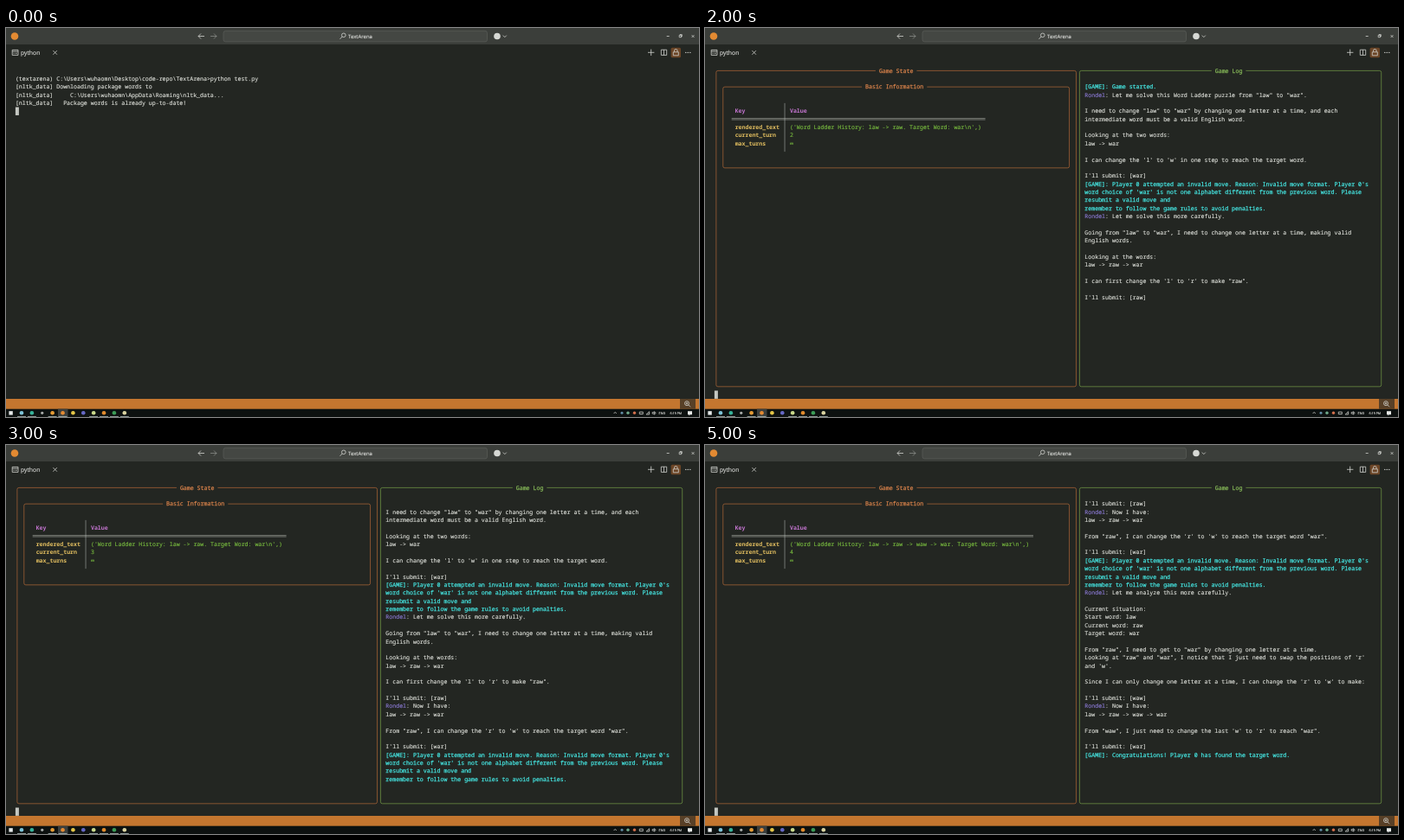
Write an HTML page that moves like this. It is 800 px wide and 450 px high and loops after 6000 ms.

```html
<!DOCTYPE html>
<html lang="en">
<head>
<meta charset="utf-8">
<title>Word Ladder terminal</title>
<style>
  html, body { margin: 0; width: 100%; height: 100%; overflow: hidden; background: #232622; }
  svg { display: block; width: 800px; height: 450px; }
  text { white-space: pre; text-rendering: geometricPrecision; fill: var(--ink); stroke: var(--ink); stroke-width: .14; }
  .term text { --ink: #dcded8; font: 6.597px "Noto Sans Mono", monospace; }
  .ui text { --ink: #d8d9d6; font-family: "Open Sans", "Noto Sans", sans-serif; }
  .term .bold { font-weight: 700; stroke: none; }
  .term .orange { --ink: #d5814a; stroke-width: .25; }
  .term .lime { --ink: #86b958; stroke-width: .25; }
  .term .green { --ink: #78bb3f; }
  .term .pink { --ink: #c475d0; }
  .term .gold { --ink: #e3bf60; }
  .term .cyan { --ink: #45e4e0; stroke-width: .25; }
  .violet { fill: #8878d0; stroke: #8878d0; }
  .line { fill: none; stroke-width: .65; }
  .thin { stroke-width: .5; }
  .icon { fill: none; stroke: #d2d4d0; stroke-width: .8; }
  .scene { visibility: hidden; animation: show 6s step-end infinite; }
  @keyframes show {
    0% { visibility: visible; }
    16.6666%, 100% { visibility: hidden; }
  }
</style>
</head>
<body>
<svg viewBox="0 0 800 450">
  <rect width="800" height="450" fill="#232622"/>
  <g class="ui">
    <rect width="800" height="19" fill="#3b3e3a"/>
    <circle cx="10" cy="9.5" r="4.3" fill="#e38a32"/>
    <path class="icon" d="M229 9.5h-7m3-3l-3 3 3 3"/>
    <path class="icon" stroke-opacity=".5" d="M236 9.5h7m-3-3l3 3-3 3"/>
    <rect x="251" y="3.3" width="304.5" height="12.6" rx="2.5" fill="#444743" stroke="#5b5e59" stroke-width=".7"/>
    <g class="icon"><circle cx="389.8" cy="8.3" r="2.3"/><path d="M388.1 10l-2.6 2.8"/></g>
    <text x="395" y="11.8" font-size="6">TextArena</text>
    <circle cx="567" cy="9.5" r="3.8" fill="#d6d8d4"/>
    <path class="icon" d="M573.8 8.6l2 2 2-2"/>
    <path class="icon" stroke-width=".5" d="M762.7 9.5h3M777.2 8.4h2.3v2.3h-2.3zM778 8.2v-.6h2.3v2.3h-.6M791.7 8.2l2.7 2.7m0-2.7l-2.7 2.7"/>

    <path class="icon" d="M7.2 25.4h6.8v6H7.2zM7.2 27.2h6.8M8.5 29.3h1.2m1 0h2"/>
    <text x="17" y="31.4" font-size="6.8">python</text>
    <path class="icon" d="M54.4 26.2l4.5 4.5m0-4.5l-4.5 4.5"/>
    <path class="icon" d="M741 28.3h7.4M744.7 24.6v7.4M756.3 25.2h6.4v6.2h-6.4zM759.5 25.2v6.2"/>
    <rect x="767.6" y="22.8" width="11.4" height="11.4" rx="1.5" fill="#6b4526"/>
    <path class="icon" stroke="#e0a066" d="M770.3 27.8h6v4h-6zM771.5 27.8v-1.5a1.8 1.8 0 0 1 3.6 0v1.5"/>
    <g fill="#d2d4d0"><circle cx="784.8" cy="28.4" r=".7"/><circle cx="787.3" cy="28.4" r=".7"/><circle cx="789.8" cy="28.4" r=".7"/></g>

    <rect y="429" width="800" height="12" fill="#c4762f"/>
    <rect x="778" y="429" width="18" height="11.6" fill="#584027"/>
    <g class="icon"><circle cx="786" cy="434.2" r="2.5"/><path d="M787.8 436l2.3 2.3M784.8 434.2h2.4M786 433v2.4"/></g>
    <rect y="440.7" width="800" height="9.3" fill="#0d1110"/>
    <rect x="60" y="440.7" width="11.5" height="9.3" fill="#3b3e3d"/>
    <g id="taskbar"></g>
    <path class="icon" stroke-width=".5" d="M701.6 446l1.6-1.6 1.6 1.6M731.3 444.2h4v2.4h-4zM746.2 444.7h1l1.2-1v3.4l-1.2-1h-1zM749.4 444.2q1 1.2 0 2.4M739.2 447l3.4-3.2v3.2z"/>
    <path fill="#e8eae8" d="M787 443.2h5v4h-2.2l-1.3 1.2v-1.2H787z"/>
    <text x="753.6" y="446.8" font-size="3.7">ENG</text>
    <text x="766.6" y="446.8" font-size="3.6">6:19 PM</text>
  </g>
  <g class="term" id="terminal"></g>
</svg>
<script>
const NS = "http://www.w3.org/2000/svg";
const terminal = document.getElementById("terminal");
const colX = col => 10.9 + col * 3.958;
const midX = col => colX(col + .5);
const rowY = row => 49.4 + row * 9.37;

function add(parent, tag, attrs, content = "") {
  const node = document.createElementNS(NS, tag);
  for (const key in attrs) node.setAttribute(key, attrs[key]);
  node.textContent = content;
  parent.append(node);
  return node;
}

function print(parent, col, row, content, style = "") {
  return add(parent, "text", { x: colX(col), y: rowY(row) + 2.1, class: style }, content);
}

function stroke(parent, d, color, style = "") {
  add(parent, "path", { d, class: `line ${style}`, stroke: color });
}

function cursor(parent, row) {
  add(parent, "rect", { x: colX(0), y: rowY(row) - 4.7, width: 4, height: 9.4, fill: "#c3c6c0" });
}

// Rounded frame through cell centres, open around its title
function panel(parent, left, right, top, bottom, title, titleCol, style, color) {
  const [l, r, t, b] = [midX(left), midX(right), rowY(top), rowY(bottom)];
  const gapStart = colX(titleCol - 1), gapEnd = colX(titleCol + title.length + 1);
  stroke(parent, `M${gapStart} ${t}H${l + 2}Q${l} ${t} ${l} ${t + 2}V${b - 2}Q${l} ${b} ${l + 2} ${b}` +
    `H${r - 2}Q${r} ${b} ${r} ${b - 2}V${t + 2}Q${r} ${t} ${r - 2} ${t}H${gapEnd}`, color);
  print(parent, titleCol, top, title, style);
}

const invalidMove = `[GAME]: Player 0 attempted an invalid move. Reason: Invalid move format. Player 0's
word choice of 'war' is not one alphabet different from the previous word. Please
resubmit a valid move and
remember to follow the game rules to avoid penalties.`;

const log = `[GAME]: Game started.
Rondel: Let me solve this Word Ladder puzzle from "law" to "war".

I need to change "law" to "war" by changing one letter at a time, and each
intermediate word must be a valid English word.

Looking at the two words:
law -> war

I can change the 'l' to 'w' in one step to reach the target word.

I'll submit: [war]
${invalidMove}
Rondel: Let me solve this more carefully.

Going from "law" to "war", I need to change one letter at a time, making valid
English words.

Looking at the words:
law -> raw -> war

I can first change the 'l' to 'r' to make "raw".

I'll submit: [raw]
Rondel: Now I have:
law -> raw -> war

From "raw", I can change the 'r' to 'w' to reach the target word "war".

I'll submit: [war]
${invalidMove}
Rondel: Let me analyze this more carefully.

Current situation:
Start word: law
Current word: raw
Target word: war

From "raw", I need to get to "war" by changing one letter at a time.
Looking at "raw" and "war", I notice that I just need to swap the positions of 'r'
and 'w'.

Since I can only change one letter at a time, I can change the 'r' to 'w' to make:

I'll submit: [waw]
Rondel: Now I have:
law -> raw -> waw -> war

From "waw", I just need to change the last 'w' to 'r' to reach "war".

I'll submit: [war]
[GAME]: Congratulations! Player 0 has found the target word.`.split("\n");

const gameLines = new Set(invalidMove.split("\n"));

function logLine(parent, row, content) {
  const isGame = content.startsWith("[GAME]") || gameLines.has(content);
  const node = print(parent, 108, row, "", isGame ? "cyan" : "");
  if (content.startsWith("Rondel")) {
    add(node, "tspan", { class: "violet" }, "Rondel");
    content = content.slice(6);
  }
  node.append(content);
}

function scene(index) {
  return add(terminal, "g", { class: "scene", style: `animation-delay:${index}s` });
}

function startup() {
  const group = scene(0);
  [
    "(textarena) C:\\Users\\wuhaomn\\Desktop\\code-repo\\TextArena>python test.py",
    "[nltk_data] Downloading package words to",
    "[nltk_data]     C:\\Users\\wuhaomn\\AppData\\Roaming\\nltk_data...",
    "[nltk_data]   Package words is already up-to-date!"
  ].forEach((content, i) => print(group, 0, i + 1, content));
  cursor(group, 5);
}

function game({ history, turn, from, to }, index) {
  const group = scene(index + 1);
  const value = `('Word Ladder History: ${history}. Target Word: war\\n',)`;
  panel(group, 0, 105, 0, 39, "Game State", 48, "orange", "#bd6d3a");
  panel(group, 2, 103, 2, 12, "Basic Information", 44, "orange", "#bd6d3a");
  panel(group, 106, 194, 0, 39, "Game Log", 146, "lime", "#7aa64a");

  print(group, 6, 5, "Key", "pink bold");
  print(group, 22, 5, "Value", "pink bold");
  stroke(group, `M${midX(20)} ${rowY(4)}V${rowY(10)}`, "#c5c8c2", "thin");
  for (const dy of [-1, .4])
    stroke(group, `M${colX(5)} ${rowY(6) + dy}H${colX(23 + value.length)}`, "#c5c8c2", "thin");
  [["rendered_text", value], ["current_turn", turn], ["max_turns", "∞"]].forEach(([key, val], i) => {
    print(group, 6, 7 + i, key, "gold bold");
    print(group, 22, 7 + i, val, "green");
  });

  log.slice(from, to).forEach((content, i) => logLine(group, i + 2, content));
  cursor(group, 40);
}

function taskbar() {
  const bar = document.getElementById("taskbar");
  const dot = (x, size, fill) => add(bar, "circle", { cx: x, cy: 445.3, r: size, fill });
  add(bar, "rect", { x: 3.4, y: 443.2, width: 4.4, height: 4.4, fill: "#e6eaea" });
  ["#7cc3d8", "#36b39a", "#a9adab", "#e39a35", "#e38a32", "#e3c548",
    "#6568c5", "#c9d98b", "#e08b2d", "#3b9c57", "#d9d3a0"].forEach((fill, i) => {
    const x = 18 + i * 11.88;
    dot(x, i === 2 ? 1.6 : 2.3, fill);
    if (![2, 5, 6].includes(i))
      add(bar, "rect", { x: x - 5, y: 449.2, width: 10, height: .8, fill: "#a9b8b6" });
  });
  dot(711, 1.5, "#638fa8");
  dot(718, 1.7, "#6ea98a");
  dot(725.5, 1.7, "#d3704d");
}

taskbar();
startup();
[
  { history: "law", turn: "1", from: 0, to: 16 },
  { history: "law -> raw", turn: "2", from: 0, to: 27 },
  { history: "law -> raw", turn: "3", from: 2, to: 37 },
  { history: "law -> raw -> waw", turn: "4", from: 18, to: 51 },
  { history: "law -> raw -> waw -> war", turn: "4", from: 26, to: 58 }
].forEach(game);
</script>
</body>
</html>
```
